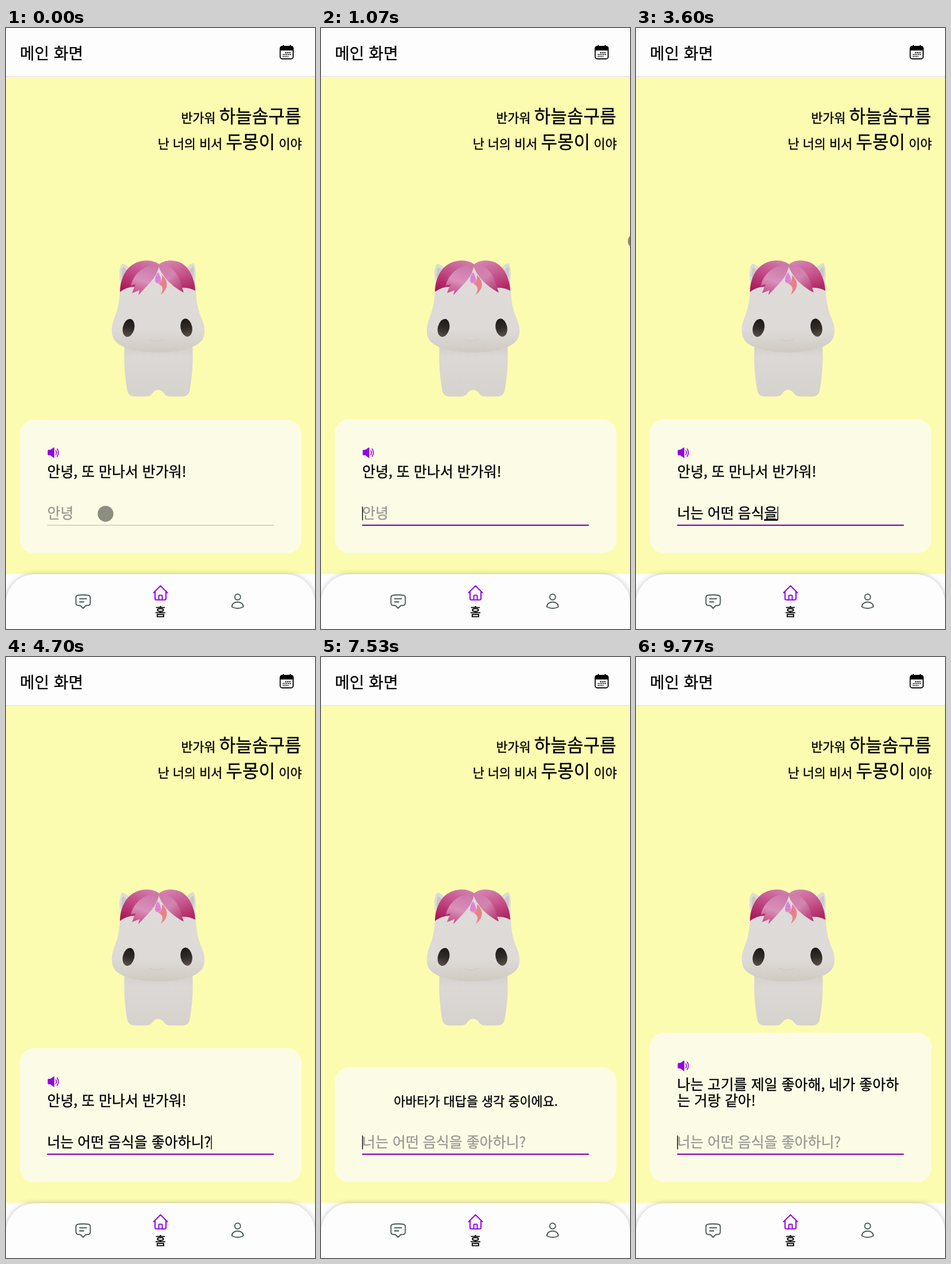
An HTML page for the animation above (9.81 s loop, 537x1043 px).

```html
<!DOCTYPE html>
<html lang="ko">
<head>
<meta charset="utf-8">
<style>
  html, body { margin: 0; width: 100%; height: 100%; overflow: hidden; background: #fcfcb0; }
  svg { display: block; width: 100vw; height: 100vh; }
  text {
    font: 24.9px "Noto Sans CJK KR", "Noto Sans CJK", "Noto Sans KR", sans-serif;
    white-space: pre; fill: currentColor; stroke: currentColor; stroke-width: .35px;
  }
  .small { font-size: 21.8px; }
  .big { font-size: 31px; }
  .line { fill: none; stroke-linecap: round; stroke-linejoin: round; }
  #panel { filter: drop-shadow(0 0 5px rgba(0, 0, 0, .25)); }
</style>
</head>
<body>
<svg viewBox="0 0 537 1043">
  <defs>
    <linearGradient id="skin" x2="0" y2="1">
      <stop stop-color="#dedbd9"/><stop offset=".75" stop-color="#dddad7"/><stop offset="1" stop-color="#d0cbc1"/>
    </linearGradient>
    <linearGradient id="torso" x2="0" y2="1">
      <stop stop-color="#d3cfc9"/><stop offset=".25" stop-color="#dbd8d6"/><stop offset="1" stop-color="#d6d2cd"/>
    </linearGradient>
    <linearGradient id="back" x1=".8" x2=".3" y2="1">
      <stop stop-color="#d17fae"/><stop offset=".5" stop-color="#c24a86"/><stop offset="1" stop-color="#a81a5a"/>
    </linearGradient>
    <linearGradient id="back2" x1=".2" x2=".7" y2="1">
      <stop stop-color="#d486b2"/><stop offset=".5" stop-color="#c8588f"/><stop offset="1" stop-color="#b02563"/>
    </linearGradient>
    <linearGradient id="front" x1=".6" x2=".3" y2="1">
      <stop stop-color="#cc78a8"/><stop offset=".55" stop-color="#d891ba"/><stop offset="1" stop-color="#c74a83"/>
    </linearGradient>
    <linearGradient id="front2" x2=".9" y2="1">
      <stop stop-color="#cf7aa9"/><stop offset=".5" stop-color="#d284af"/><stop offset="1" stop-color="#b5336d"/>
    </linearGradient>
    <linearGradient id="eye" x2="0" y2="1">
      <stop stop-color="#1c1a18"/><stop offset=".5" stop-color="#2f2a26"/><stop offset="1" stop-color="#5a5148"/>
    </linearGradient>
  </defs>

  <rect width="537" height="1043" fill="#fcfcb0"/>
  <rect width="537" height="84" fill="#fdfdfd"/>
  <rect y="83.5" width="537" height="1.5" fill="#e3e3ea"/>
  <text x="24" y="53.500" style="font-size:27.800px">메인 화면</text>

  <g id="calendar">
    <rect x="476.5" y="32" width="22.5" height="21.5" rx="3.5" fill="none" stroke="#000" stroke-width="1.8"/>
    <path d="M476 39v-4q0-3.5 3.5-3.5h16.5q3.5 0 3.5 3.5v4z"/>
    <path class="line" d="M482 30.5v2M494 30.5v2" stroke="#000" stroke-width="2.2"/>
    <path d="M485 43h10M481 46.2h14M481 49.3h10" stroke="#000" stroke-width="1.8" stroke-dasharray="1.8 1.2"/>
  </g>

  <text x="513" y="163.500" text-anchor="end" class="small">반가워 <tspan class="big">하늘솜구름</tspan></text>
  <text x="514" y="208.500" text-anchor="end" class="small">난 너의 비서 <tspan class="big">두몽이</tspan> 이야</text>

  <g id="avatar">
    <path d="M206 550C204 580 207 610 211 630Q213 639 223 639.5H244Q252 639 255 633Q264 623 274 633Q277 639 285 639.5H307Q317 639 319 630C323 610 326 580 324 550Z" fill="url(#torso)"/>
    <path d="M198 440C196 424 198 412 202 409.5Q206 408 216 418ZM329 440C331 424 329 412 326 408.5Q322 407 311 418Z" fill="#dcdcd5"/>
    <path d="M201 434Q200 418 204 415L210 421ZM326 434Q328 418 325 414L318 421Z" fill="#cbc8c4"/>
    <path d="M199 440C198 475 194 490 188 504C183 518 182 532 188 541C198 556 230 563 264 563C300 563 331 556 341 541C347 532 346 518 340 504C334 490 330 475 329 440C318 418 298 409 264 409C230 409 210 418 199 440Z" fill="url(#skin)"/>
    <path d="M198 458C199 428 214 405 243 403.5Q257 403 266 410L224 449Q210 449 198 458Z" fill="url(#back)"/>
    <path d="M217 447C221 429 238 410 266 410C264 430 251 441 240 453L230 463.5L232 455L219 460Q222 452 225 445Z" fill="url(#front)"/>
    <path d="M266 410C276 402 291 402 303 407C319 415 328 435 329 456Q318 450 304 451Z" fill="url(#back2)"/>
    <path d="M264 411C285 408 301 425 306 451L309 459C292 451 272 434 264 411Z" fill="url(#front2)"/>
    <path d="M271 429C285 441 280 455 269 463C274 453 273 448 265 444Q272 441 271 429Z" fill="#e98089"/>
    <path d="M264 424Q268 428 269.5 437Q269.5 443 264.5 443Q259 443 259 437Q260 428 264 424Z" fill="#df87d6"/>
    <path d="M260 433h8M259.5 438h9.5" stroke="#c968c4" stroke-width="1" opacity=".6"/>
    <ellipse cx="213" cy="520.5" rx="10" ry="15.8" transform="rotate(13 213 520.5)" fill="url(#eye)"/>
    <ellipse cx="313.5" cy="520" rx="10" ry="15.8" transform="rotate(-11 313.5 520)" fill="url(#eye)"/>
    <path class="line" d="M249 540Q261 547 274 540" stroke="#d2cdc2" stroke-width="1.5"/>
  </g>

  <rect id="card" x="24" width="489.500" rx="25" fill="#fcfce6"/>
  <g id="speaker" fill="#9200e6">
    <path d="M72.5 733.5q0-1.5 1.5-1.5h3l6-4q1-.5 1 1v16q0 1.5-1 1l-6-4.5h-3q-1.5 0-1.5-1.5z"/>
    <path class="line" d="M86.5 733.5q2.5 3.5 0 7M89 730.5q4 6.5 0 13" stroke="#9200e6" stroke-width="1.6"/>
  </g>
  <text id="line1"></text>
  <text id="line2" x="71.5" y="778.5"></text>

  <text id="field" x="71.5" y="850.5"><tspan id="done"></tspan><tspan id="composing" text-decoration="underline"></tspan></text>
  <rect id="caret" y="830.5" width="1.4" height="24"/>
  <rect x="71.5" y="862" width="394" height="1.8" fill="#d3d2c4"/>
  <rect id="focusLine" y="861.8" height="2.2" fill="#8208b8"/>

  <rect y="947.5" width="537" height="96" fill="#fff"/>
  <rect id="panel" y="948" width="537" height="160" rx="50" fill="#fdfdfd"/>
  <g class="line" stroke="#4b5b58" stroke-width="1.9">
    <path d="M125 984.5Q134 983 143 984.5Q146.5 985 146.5 989V997Q146.5 1001.5 143 1002L138.5 1002.5L134 1007L129.5 1002.5L125 1002Q121.5 1001.5 121.5 997V989Q121.5 985 125 984.5ZM128 990.5H140M128 996H135"/>
    <circle cx="402.5" cy="987.5" r="5"/>
    <path d="M392.5 1004.5C392.5 993.5 412.5 993.5 412.5 1004.5Q402.5 1010 392.5 1004.5Z"/>
  </g>
  <path class="line" d="M256.5 980L268.5 968L280.5 980M259 978V990Q259 992.5 261.5 992.5H275.5Q278 992.5 278 990V978M265.5 992V985.5Q265.5 984.5 266.5 984.5H270.5Q271.5 984.5 271.5 985.5V992" stroke="#9200e6" stroke-width="2"/>
  <text x="268.5" y="1020.5" text-anchor="middle" style="font-size:20.5px">홈</text>

  <circle id="pointer" r="13.7" opacity=".44"/>
</svg>
<script>
const LOOP = 9810, FOCUS = 600, TYPE = 1520, KEY = 100, SEND = 5300, ANSWER = 8500;
const QUESTION = '너는 어떤 음식을 좋아하니?';
const LEADS = 'ㄱㄲㄴㄷㄸㄹㅁㅂㅃㅅㅆㅇㅈㅉㅊㅋㅌㅍㅎ';
const $ = id => document.getElementById(id);
const set = (id, attrs) => { for (const k in attrs) $(id).setAttribute(k, attrs[k]); };
const put = (id, text) => { if ($(id).textContent !== text) $(id).textContent = text; };
const ramp = (t, start, length) => Math.min(1, Math.max(0, (t - start) / length));

// Every key press as [committed text, syllable being composed]
const keys = [...QUESTION].flatMap((c, i) => {
  const before = QUESTION.slice(0, i), n = c.charCodeAt(0) - 0xAC00;
  if (n < 0) return [[before + c, '']];
  const open = String.fromCharCode(0xAC00 + n - n % 28);
  return [...new Set([LEADS[n / 588 | 0], open, c])].map(s => [before, s]);
});

function reply(t) {
  if (t < SEND) return { top: t < FOCUS ? 680 : 679, y: 778.5, a: '안녕, 또 만나서 반가워!', shift: 0 };
  if (t < ANSWER) return { top: 712, y: 779, a: '아바타가 대답을 생각 중이에요.', wait: true };
  return { top: 652, y: 751, a: '나는 고기를 제일 좋아해, 네가 좋아하', b: '는 거랑 같아!', shift: -27.5 };
}

function draw(t) {
  const r = reply(t);
  set('card', { y: r.top, height: 911.5 - r.top });
  set('speaker', { transform: `translate(0 ${r.shift || 0})`, visibility: r.wait ? 'hidden' : 'visible' });
  set('line1', { x: r.wait ? 269 : 71.5, y: r.y, 'text-anchor': r.wait ? 'middle' : 'start', class: r.wait ? 'small' : '' });
  put('line1', r.a);
  put('line2', r.b || '');

  const typing = t >= TYPE && t < SEND;
  const step = Math.min(keys.length - 1, Math.floor((t - TYPE) / KEY));
  const [done, composing] = typing ? keys[step] : [t < TYPE ? '안녕' : QUESTION, ''];
  put('done', done);
  put('composing', composing);
  set('field', { color: typing ? '#000' : '#999892' });

  const since = typing ? t - TYPE - step * KEY : t - (t < TYPE ? FOCUS : SEND);
  const x = typing ? 71.5 + $('field').getComputedTextLength() : 71.5;
  set('caret', { x, visibility: t >= FOCUS && since % 1000 < 500 ? 'visible' : 'hidden' });

  const grow = 1 - (1 - ramp(t, FOCUS, 200)) ** 3;
  set('focusLine', { x: 268.5 - 197 * grow, width: 394 * grow });

  const p = ramp(t, 650, 350), e = p * p * (3 - 2 * p);
  set('pointer', { cx: 173 + 374 * e, cy: 843 - 473 * e, visibility: t < 3400 ? 'visible' : 'hidden' });
}

const begin = performance.now();
function frame() {
  draw((performance.now() - begin) % LOOP);
  requestAnimationFrame(frame);
}
frame();
</script>
</body>
</html>
```
